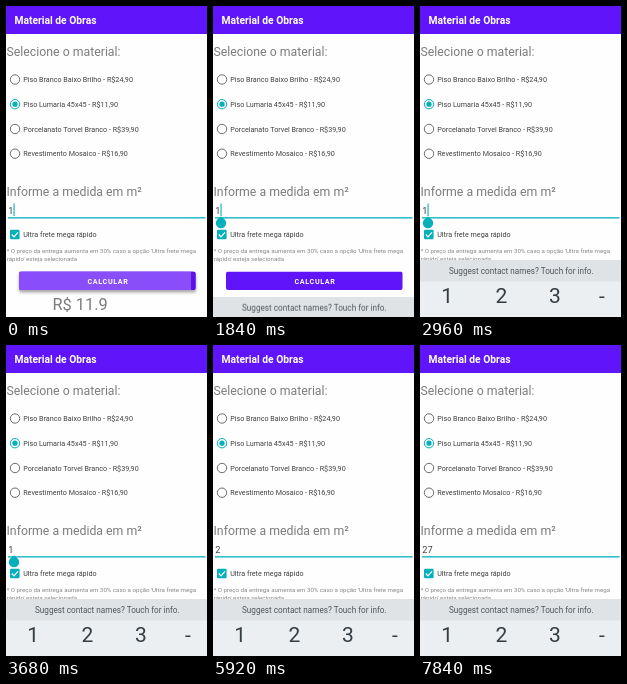
An HTML page that plays this animation: 201 px wide and 311 px high, repeating every 8 s.

```html
<!DOCTYPE html>
<html lang="pt-BR">
<head>
<meta charset="utf-8">
<title>Material de Obras</title>
<style>
  html, body { margin: 0; width: 100%; height: 100%; overflow: hidden; background: #fff; }
  svg { display: block; width: 100vw; height: 100vh; font-family: Roboto, sans-serif; }

  .title { font-size: 10.3px; font-weight: 700; fill: #fff; }
  .heading { font-size: 12.3px; fill: #7c7c7c; }
  .option { font-size: 7.2px; fill: #404040; }
  .note { font-size: 6.15px; fill: #868686; }
  .value { font-size: 9.2px; fill: #404040; }
  .label { font-size: 7.2px; font-weight: 700; letter-spacing: .64px; fill: #fff; }
  .result { font-size: 16.35px; fill: #7c7c7c; }
  .hint { font-size: 8.18px; fill: #50565a; }
  .key { font-size: 21px; fill: #333d43; }
  .radio { fill: none; stroke: #6c6c6c; stroke-width: 1; }
  .radio .checked { stroke: #06b0ba; }
  .teal { fill: #06b0ba; }

  /* Every track shares the 8 s loop: 1% = 80 ms */
  .hold { animation: 8s step-end infinite; }
  .slide { animation: 8s linear infinite; }

  .old-price { animation-name: old-price; }
  .new-price { animation-name: new-price; }
  .one { animation-name: one; }
  .two { animation-name: two; }
  .twenty-seven { animation-name: twenty-seven; }
  .caret { animation-name: blink; }
  .caret-place { animation-name: caret-place; }
  .handle { animation-name: handle; }
  .press { animation-name: press; }
  .ripple { animation-name: ripple; }
  .keyboard { animation-name: rise; }

  @keyframes old-price { 0% { opacity: 1 } 2%, 100% { opacity: 0 } }
  @keyframes new-price { 0% { opacity: 0 } 2%, 100% { opacity: 1 } }
  @keyframes one { 0% { opacity: 1 } 50.5%, 100% { opacity: 0 } }
  @keyframes two { 0%, 79%, 100% { opacity: 0 } 66% { opacity: 1 } }
  @keyframes twenty-seven { 0% { opacity: 0 } 79%, 100% { opacity: 1 } }
  @keyframes handle { 0%, 50.5%, 100% { opacity: 0 } 22% { opacity: 1 } }
  @keyframes blink {
    0%, 11.5%, 22%, 34.5%, 47%, 63%, 79%, 91.5% { opacity: 1 }
    5.25%, 17.75%, 28.25%, 40.75%, 56.75%, 72.25%, 85.25%, 97.75%, 100% { opacity: 0 }
  }
  @keyframes caret-place {
    0% { transform: translateX(8px) }
    50.5% { transform: translateX(2.8px) }
    66% { transform: translateX(8px) }
    79%, 100% { transform: translateX(13.2px) }
  }
  @keyframes press { 0%, 2% { opacity: 1 } 8%, 100% { opacity: 0 } }
  @keyframes ripple { 0% { transform: none } 1%, 100% { transform: scaleX(1.03) } }
  @keyframes rise {
    0%, 22.5% { transform: translateY(58px); animation-timing-function: cubic-bezier(0, 0, .2, 1) }
    26.5%, 100% { transform: none }
  }
</style>
</head>
<body>
<svg viewBox="0 0 201 311" preserveAspectRatio="none">
  <defs>
    <filter id="soft" x="-10%" y="-50%" width="120%" height="200%">
      <feGaussianBlur stdDeviation="1.6"/>
    </filter>
    <clipPath id="button"><rect x="13" y="265.5" width="176.5" height="18.5" rx="2"/></clipPath>
  </defs>

  <rect width="201" height="311" fill="#fefefe"/>
  <rect width="201" height="28" fill="#6014f9"/>
  <text class="title" x="8.4" y="18">Material de Obras</text>

  <text class="heading" x="0.5" y="49.8">Selecione o material:</text>
  <g class="radio">
    <circle cx="9" cy="73.5" r="4.7"/>
    <circle class="checked" cx="9" cy="98.2" r="4.7"/>
    <circle cx="9" cy="123" r="4.7"/>
    <circle cx="9" cy="147.7" r="4.7"/>
  </g>
  <circle class="teal" cx="9" cy="98.2" r="2.6"/>
  <g class="option">
    <text x="17.2" y="76">Piso Branco Baixo Brilho - R$24,90</text>
    <text x="17.2" y="100.8">Piso Lumaria 45x45 - R$11,90</text>
    <text x="17.2" y="125.5">Porcelanato Torvel Branco - R$39,90</text>
    <text x="17.2" y="150.2">Revestimento Mosaico - R$16,90</text>
    <text x="17.2" y="231">Ultra frete mega rápido</text>
  </g>

  <text class="heading" x="0.5" y="189.7">Informe a medida em m²</text>
  <g class="value">
    <text class="hold one" x="2.3" y="207.5">1</text>
    <text class="hold two" x="2.3" y="207.5">2</text>
    <text class="hold twenty-seven" x="2.3" y="207.5">27</text>
  </g>
  <rect class="teal" x="2" y="211.2" width="197.5" height="1.3"/>
  <g class="hold caret-place">
    <rect class="teal hold caret" x="-.5" y="197.5" width="1.1" height="12.5"/>
  </g>
  <path class="teal hold handle" d="M8 210.5 L11.7 213.4 A5.2 5.2 0 1 1 4.3 213.4 Z"/>

  <rect class="teal" x="4" y="223.7" width="9.6" height="9.6" rx="1.2"/>
  <path d="M5.8 228.5 L8 230.8 L12 226.3" fill="none" stroke="#fff" stroke-width="1.2"/>

  <g class="note">
    <text x="0.7" y="247">* O preço da entrega aumenta em 30% caso a opção 'Ultra frete mega</text>
    <text x="0.7" y="254.7">rápido' esteja selecionada</text>
  </g>

  <rect class="slide press" x="13" y="268" width="177" height="18.5" rx="2" fill="#555" fill-opacity=".5" filter="url(#soft)"/>
  <g clip-path="url(#button)">
    <rect x="13" y="265" width="177" height="20" fill="#6014f9"/>
    <g class="slide press">
      <rect x="13" y="265" width="177" height="20" fill="#5a10e6"/>
      <rect class="slide ripple" x="13" y="265" width="172" height="20" fill="#8a4dfa"/>
    </g>
  </g>
  <text class="label" x="102" y="277.5" text-anchor="middle">CALCULAR</text>

  <text class="result hold old-price" x="46.5" y="304.3">R$ 11.9</text>
  <text class="result hold new-price" x="46.5" y="304.3">R$ 15.47</text>

  <g class="slide keyboard" text-anchor="middle">
    <rect y="254" width="201" height="57" fill="#eceff1"/>
    <rect y="254" width="201" height="21.5" fill="#dfe3e6"/>
    <text class="hint" x="101.3" y="268">Suggest contact names? Touch for info.</text>
    <g class="key">
      <text x="27.1" y="297">1</text>
      <text x="81.3" y="297">2</text>
      <text x="134.8" y="297">3</text>
      <text x="182" y="297">-</text>
    </g>
  </g>
</svg>
</body>
</html>
```
